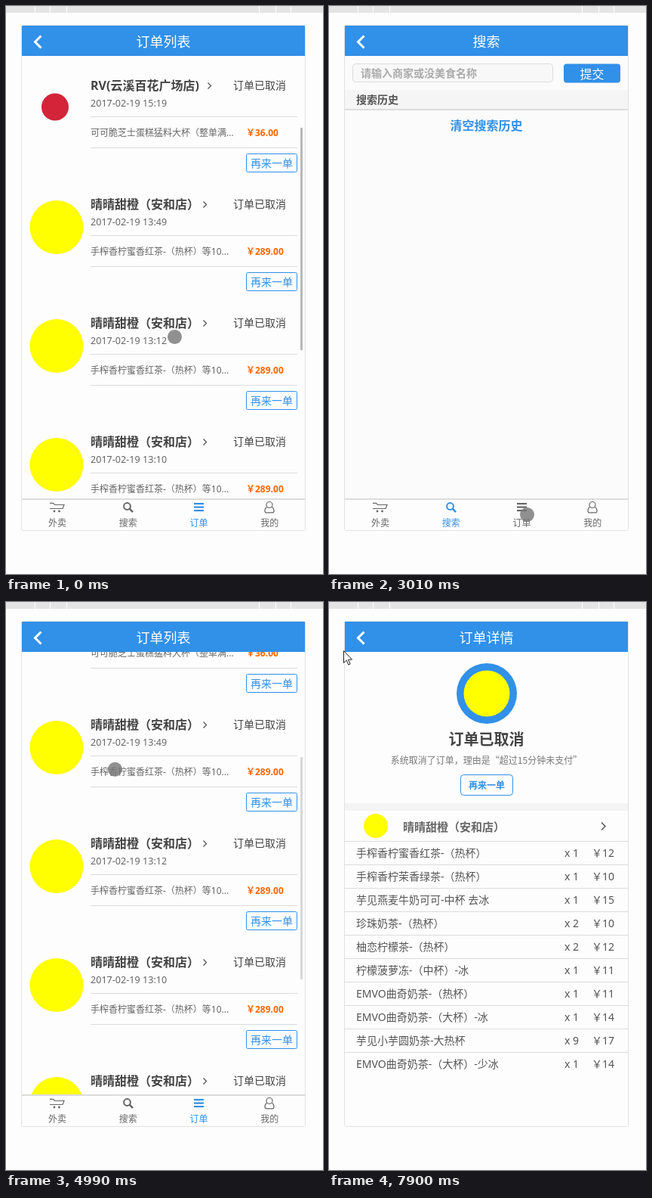
An HTML page for the animation above (8 s loop, 420 by 751 pixels).

```html
<!DOCTYPE html>
<html lang="zh-CN">
<head>
<meta charset="utf-8">
<title>订单列表</title>
<style>
html, body { margin: 0; width: 100%; height: 100%; overflow: hidden; background: #fdfdfd; }
svg { display: block; width: 100%; height: 100%; font-family: "Noto Sans", "Noto Sans CJK SC", "Noto Sans CJK", sans-serif; }
.cjk { font-family: "Noto Sans CJK SC", "Noto Sans CJK", sans-serif; }
.bold { font-weight: 700; }
.mid { text-anchor: middle; }
</style>
</head>
<body>
<svg id="stage" viewBox="0 0 420 751"></svg>
<script>
const LOOP = 8000, BLUE = '#3190e8', PAPER = '#fdfdfd', LINE = '#dcdcdc', CENTER = 208.5;

// y is the optical middle of the line of text
const text = (x, y, size, fill, str, style = '') =>
  `<text x="${x}" y="${y + size * .37}" font-size="${size}" fill="${fill}" class="${style}">${str}</text>`;
const rect = (x, y, w, h, fill, more = '') =>
  `<rect x="${x}" y="${y}" width="${w}" height="${h}" fill="${fill}" ${more}/>`;
const disc = (x, y, r, fill) => `<circle cx="${x}" cy="${y}" r="${r}" fill="${fill}"/>`;
const ring = (x, y, r, color, w) => `<circle cx="${x}" cy="${y}" r="${r}" fill="none" stroke="${color}" stroke-width="${w}"/>`;
const stroke = (d, color, w) => `<path d="${d}" fill="none" stroke="${color}" stroke-width="${w}"/>`;
const chevron = (x, y, r, color, w) => stroke(`M${x - r / 2} ${y - r}l${r} ${r}l${-r} ${r}`, color, w);
const page = (title, body, paper = PAPER) => rect(21, 26, 375, 667, paper) + body +
  rect(21, 26, 375, 40, BLUE) + stroke('M46.5 39.5l-8 8l8 8', '#fff', 3) + text(CENTER, 47, 18, '#fff', title, 'mid');

const icons = [
  c => stroke('M58 657.3h4.5l2 2.2H77l-2 5H58', c, 1.2) + disc(64, 668, 1.4, c) + disc(70.5, 668, 1.4, c),
  c => ring(160.5, 661.5, 4.4, c, 2) + stroke('M163.7 664.7l4.3 4.5', c, 2.5),
  c => [0, 1, 2].map(i => rect(249, 657 + 4.5 * i, 13, 2.2, c)).join(''),
  c => ring(349, 659.5, 4, c, 1.2) + stroke('M345.5 662.5q-2.5 1.5-2.5 5q0 2.3 2 2.3h8q2 0 2-2.3q0-3.5-2.5-5', c, 1.2)
];
const tabs = active => rect(21, 651, 375, 42, PAPER) + rect(21, 651, 375, 2, LINE) +
  ['外卖', '搜索', '订单', '我的'].map((label, i) => {
    const c = i === active ? BLUE : '#666';
    return icons[i](c) + text(67.9 + 93.75 * i, 684, 12, c, label, 'mid');
  }).join('');

const TEA = { name: '晴晴甜橙（安和店）', arrow: 263.5, food: '手榨香柠蜜香红茶-（热杯）等10...', price: '￥289.00', logo: y => disc(67, y, 35.5, '#ff0') };
const ICE = { name: 'RV(云溪百花广场店)', arrow: 269.5, food: '可可脆芝士蛋糕猛料大杯（整单满...', price: '￥36.00', logo: y => disc(65, y - 2, 18, '#d3243a') };
const ROW = 157;
const orderRow = (time, i) => {
  const y = 91 + ROW * i, shop = i === 1 || i === 2 ? ICE : TEA;
  return shop.logo(y + 30.5) +
    text(112, y, 16, '#444', shop.name, 'bold') + chevron(shop.arrow, y + .5, 4, '#555', 1.3) +
    text(301, y, 14, '#444', '订单已取消') +
    text(112, y + 23, 12.6, '#666', '2017-02-19 ' + time) +
    rect(112, y + 41, 274, 1, LINE) +
    text(112, y + 62.5, 12, '#666', shop.food) +
    text(318, y + 62.5, 12, '#f60', shop.price, 'bold') +
    rect(112, y + 82, 274, 1, LINE) +
    rect(318.5, y + 90.5, 67, 24, 'none', `rx="2" stroke="${BLUE}"`) +
    text(352, y + 102.5, 14, BLUE, '再来一单', 'mid');
};
const times = ['16:03', '15:22', '15:19', '13:49', '13:12', '13:10', '13:10'];

const dishes = [
  '手榨香柠蜜香红茶-（热杯）|1|12', '手榨香柠茉香绿茶-（热杯）|1|10', '芋见燕麦牛奶可可-中杯 去冰|1|15',
  '珍珠奶茶-（热杯）|2|10', '柚恋柠檬茶-（热杯）|2|12', '柠檬菠萝冻-（中杯）-冰|1|11',
  'EMVO曲奇奶茶-（热杯）|1|11', 'EMVO曲奇奶茶-（大杯）-冰|1|14', '芋见小芋圆奶茶-大热杯|9|17',
  'EMVO曲奇奶茶-（大杯）-少冰|1|14'
];
const dishRow = (dish, i) => {
  const y = 332 + 31 * i, [name, count, price] = dish.split('|');
  return rect(21, y - 16, 375, 1, LINE) + text(36, y, 14, '#555', name) +
    text(312, y, 14, '#555', 'x ' + count) + text(348, y, 14, '#555', '￥' + price);
};

const pages = {
  orders: page('订单列表',
    `<g clip-path="url(#view)"><g id="list">${times.map(orderRow).join('')}</g></g>` +
    rect(390, 29, 3, 294, '#b8b8b8', 'id="thumb"') + tabs(2)),

  search: page('搜索',
    rect(31.5, 76.5, 265, 24, '#f8f8f8', 'rx="4" stroke="#dcdcdc"') +
    text(42, 89, 14, '#aaa', '请输入商家或没美食名称', 'bold') +
    rect(311, 76.5, 75, 25, BLUE, 'rx="4"') + text(348.5, 90, 16, '#fff', '提交', 'mid') +
    rect(21, 111, 375, 25, '#f5f5f5') + rect(21, 136, 375, 2, LINE) +
    text(36, 124, 14, '#555', '搜索历史', 'bold') +
    text(CENTER, 158, 16, BLUE, '清空搜索历史', 'bold mid') + tabs(1), '#fbfbfb'),

  detail: page('订单详情',
    disc(209, 121, 40, BLUE) + disc(209, 121, 30.5, '#ff0') +
    text(CENTER, 182, 20, '#444', '订单已取消', 'bold mid') +
    text(CENTER, 210, 12, '#777', '系统取消了订单，理由是“超过15分钟未支付”', 'cjk mid') +
    rect(174.5, 228.5, 69, 27, 'none', `rx="4" stroke="${BLUE}"`) +
    text(209, 242.5, 12, BLUE, '再来一单', 'bold mid') +
    rect(21, 266, 375, 10, '#f4f4f4') +
    disc(62, 296, 16, '#ff0') + text(98, 297, 15, '#666', TEA.name, 'bold') +
    chevron(363.5, 296.5, 5, '#555', 1.5) + dishes.map(dishRow).join(''))
};

const $ = id => document.getElementById(id);
const set = (id, attrs) => Object.entries(attrs).forEach(([k, v]) => $(id).setAttribute(k, v));

$('stage').innerHTML = `<defs>
  <clipPath id="phone"><rect x="21" y="26" width="375" height="667"/></clipPath>
  <clipPath id="view"><rect x="21" y="66" width="375" height="585"/></clipPath></defs>` +
  rect(0, 0, 420, 751, PAPER) + rect(0, 0, 420, 9, '#e4e4e4') +
  [38, 58, 80, 335, 357, 377].map(x => rect(x, 0, 1, 9, '#fff')).join('') +
  rect(20.5, 25.5, 376, 668, '#fff', 'rx="2" stroke="#e2e2e2"') +
  `<g clip-path="url(#phone)">${Object.keys(pages).map(id => `<g id="${id}">${pages[id]}</g>`).join('')}</g>
  <circle id="touch" r="9.5" fill="#777" opacity=".82"/>
  <path id="pointer" d="M19.5 64.5v16l3.7-3.5l2.6 6l2.3-1l-2.6-5.9h5z" fill="#fff" stroke="#222"/>`;

const ramp = (t, from, span) => Math.min(1, Math.max(0, (t - from) / span));
const smooth = p => p * p * (3 - 2 * p);

// Each visit starts with a tap: the old page fades out, then the new one fades in.
const FADE = 300, SLIDE = 78;
const visits = [['orders', -1000], ['search', 900], ['orders', 3170], ['detail', 5377]];

function drawPages(t) {
  for (const id in pages) set(id, { opacity: 0 });
  visits.forEach(([id, tap], i) => {
    const [next, end] = visits[i + 1] || ['', LOOP + FADE];
    const opacity = ramp(t, tap + FADE, FADE) * (1 - ramp(t, end, FADE));
    if (!opacity) return;
    const side = id === 'detail' ? 1 : next === 'detail' && t > end ? -1 : 0;
    set(id, { opacity, transform: `translate(${side * SLIDE * (1 - opacity)} 0)` });
  });
}

function drawScroll(t) {
  const first = t < 2000;
  const y = first ? 300 : 400 * ramp(t, 4130, 330);
  const shown = first ? 1 - ramp(t, 400, 200) : ramp(t, 4130, 30) * (1 - ramp(t, 4900, 200));
  set('list', { transform: `translate(0 ${-y})` });
  set('thumb', { y: 29 + .44 * y, opacity: shown });
}

// Resting points of the hand: time, x, y
const stops = [
  [100, 223, 437], [660, 47, 53], [1750, 231, 607], [2400, 152, 670], [3010, 262, 672], [3710, 266, 640],
  [4460, 185, 281], [5110, 140, 215], [5740, 105, 252], [6260, 162, 436], [7390, 208, 306], [7780, 18, 95]
];

function drawHand(t) {
  const i = Math.max(1, stops.findLastIndex(s => s[0] <= t) + 1);
  const [t0, x0, y0] = stops[i - 1], [t1, x1, y1] = stops[i] || [LOOP, x0, y0];
  const p = smooth(ramp(t, t0, t1 - t0));
  const outside = t >= 7890;
  set('touch', { cx: x0 + (x1 - x0) * p + .5, cy: y0 + (y1 - y0) * p + .5, visibility: outside ? 'hidden' : 'visible' });
  set('pointer', { visibility: outside ? 'visible' : 'hidden' });
}

const start = performance.now();
function tick() {
  const t = (performance.now() - start) % LOOP;
  drawPages(t);
  drawScroll(t);
  drawHand(t);
  requestAnimationFrame(tick);
}
tick();
</script>
</body>
</html>
```
